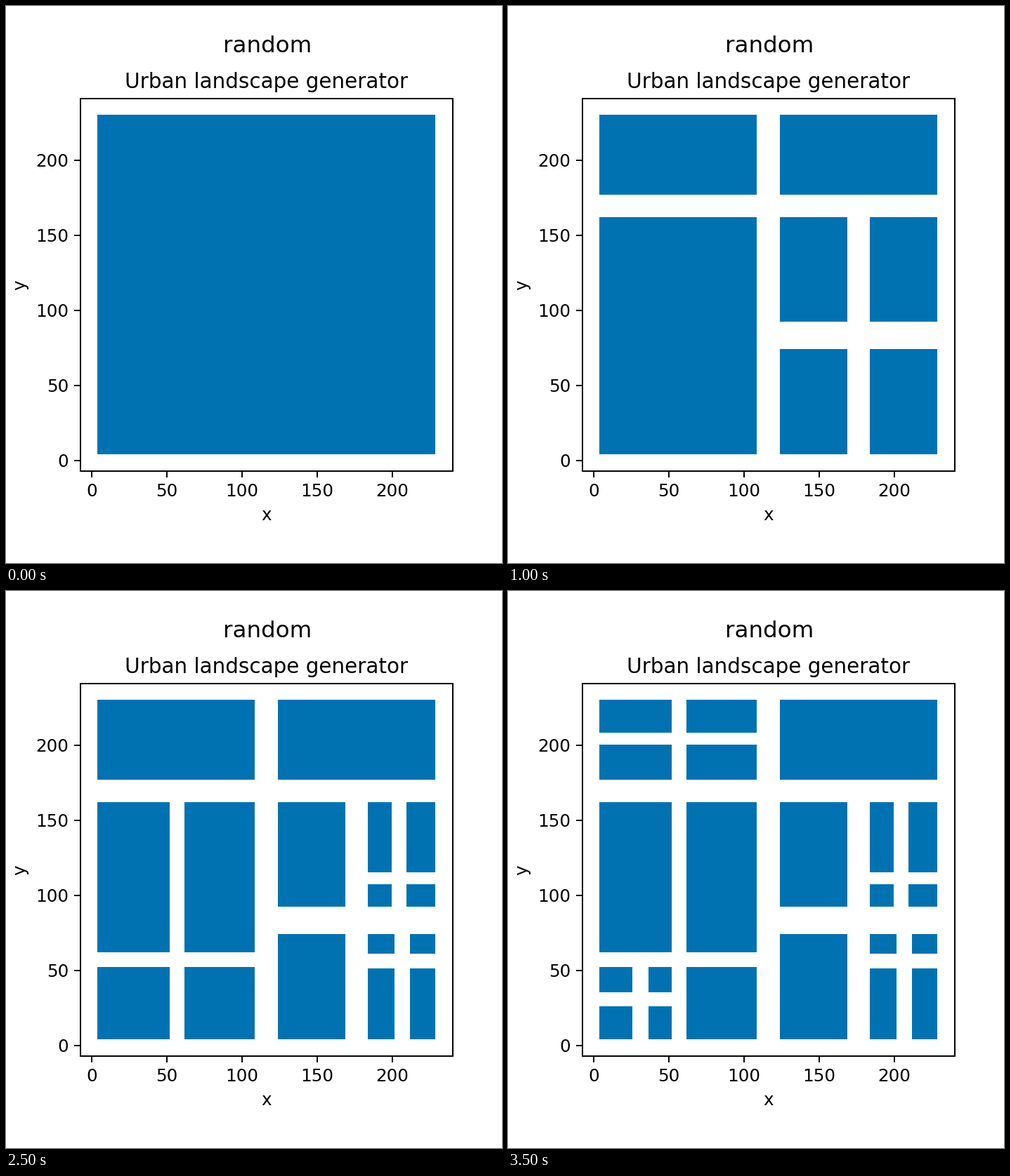
Animation, 706 px wide and 794 px high, one loop 4500 ms. Source, as a matplotlib script:

```python
import matplotlib.pyplot as plt
from matplotlib.animation import FuncAnimation
from matplotlib.patches import Rectangle
from matplotlib.transforms import ScaledTranslation

W, H, DPI = 706, 794, 128
PT = 177 / DPI  # scale of one layout point
UNIT = 2.1388  # pixels per data unit
BLUE = "#0072B2"
LOW_X, HIGH_X, LOW_Y, HIGH_Y = 4, 229, 4, 230

# Streets opened at each step: x from, x to, y from, y to.
CROSSINGS = [
    (109, 124, 162, 177),
    (169, 184, 74, 92),
    (202, 212, 51, 61),
    (200, 210, 107, 115),
    (52, 62, 52, 62),
    (26, 37, 26, 35),
    (52, 62, 200, 208),
]

plt.rcParams.update({
    "font.family": "DejaVu Sans",
    "font.size": 10 * PT,
    "axes.titlesize": 12 * PT,
    "axes.titlepad": 6 * PT,
    "axes.labelpad": 4 * PT,
    "axes.linewidth": 0.8 * PT,
})
for axis in ("xtick", "ytick"):
    plt.rcParams[f"{axis}.major.size"] = 3.5 * PT
    plt.rcParams[f"{axis}.major.pad"] = 3.5 * PT
    plt.rcParams[f"{axis}.major.width"] = 0.8 * PT


def split(blocks, crossing):
    """Replace the block around a crossing with its four corner blocks."""
    cx0, cx1, cy0, cy1 = crossing
    result = []
    for x0, x1, y0, y1 in blocks:
        if x0 < cx0 and cx1 < x1 and y0 < cy0 and cy1 < y1:
            result += [(xa, xb, ya, yb)
                       for xa, xb in ((x0, cx0), (cx1, x1))
                       for ya, yb in ((y0, cy0), (cy1, y1))]
        else:
            result.append((x0, x1, y0, y1))
    return result


def padded(low, high):
    margin = 0.05 * (high - low)
    return low - margin, high + margin


xlim, ylim = padded(LOW_X, HIGH_X), padded(LOW_Y, HIGH_Y)
fig = plt.figure(figsize=(W / DPI, H / DPI), dpi=DPI, facecolor="white")
ax = fig.add_axes([106.34 / W, 130.74 / H,
                   (xlim[1] - xlim[0]) * UNIT / W,
                   (ylim[1] - ylim[0]) * UNIT / H])
ax.set(xlim=xlim, ylim=ylim, xticks=range(0, 201, 50), yticks=range(0, 201, 50),
       xlabel="x", ylabel="y", title="Urban landscape generator")
fig.text(372.5 / W, 728 / H, "random", fontsize=13.2 * PT,
         ha="center", va="baseline")

# Half a pixel up and left, so block edges snap to the pixel they start in.
half = 0.5 / DPI
block_transform = ax.transData + ScaledTranslation(-half, half, fig.dpi_scale_trans)


def draw(step):
    blocks = [(LOW_X, HIGH_X, LOW_Y, HIGH_Y)]
    for crossing in CROSSINGS[:step]:
        blocks = split(blocks, crossing)
    for patch in list(ax.patches):
        patch.remove()
    return [ax.add_patch(Rectangle((x0, y0), x1 - x0, y1 - y0, facecolor=BLUE,
                                   linewidth=0, transform=block_transform))
            for x0, x1, y0, y1 in blocks]


# The finished plan stays for two steps.
anim = FuncAnimation(fig, draw, frames=len(CROSSINGS) + 2, interval=500,
                     repeat=True, repeat_delay=0, blit=False)
plt.show()
```
